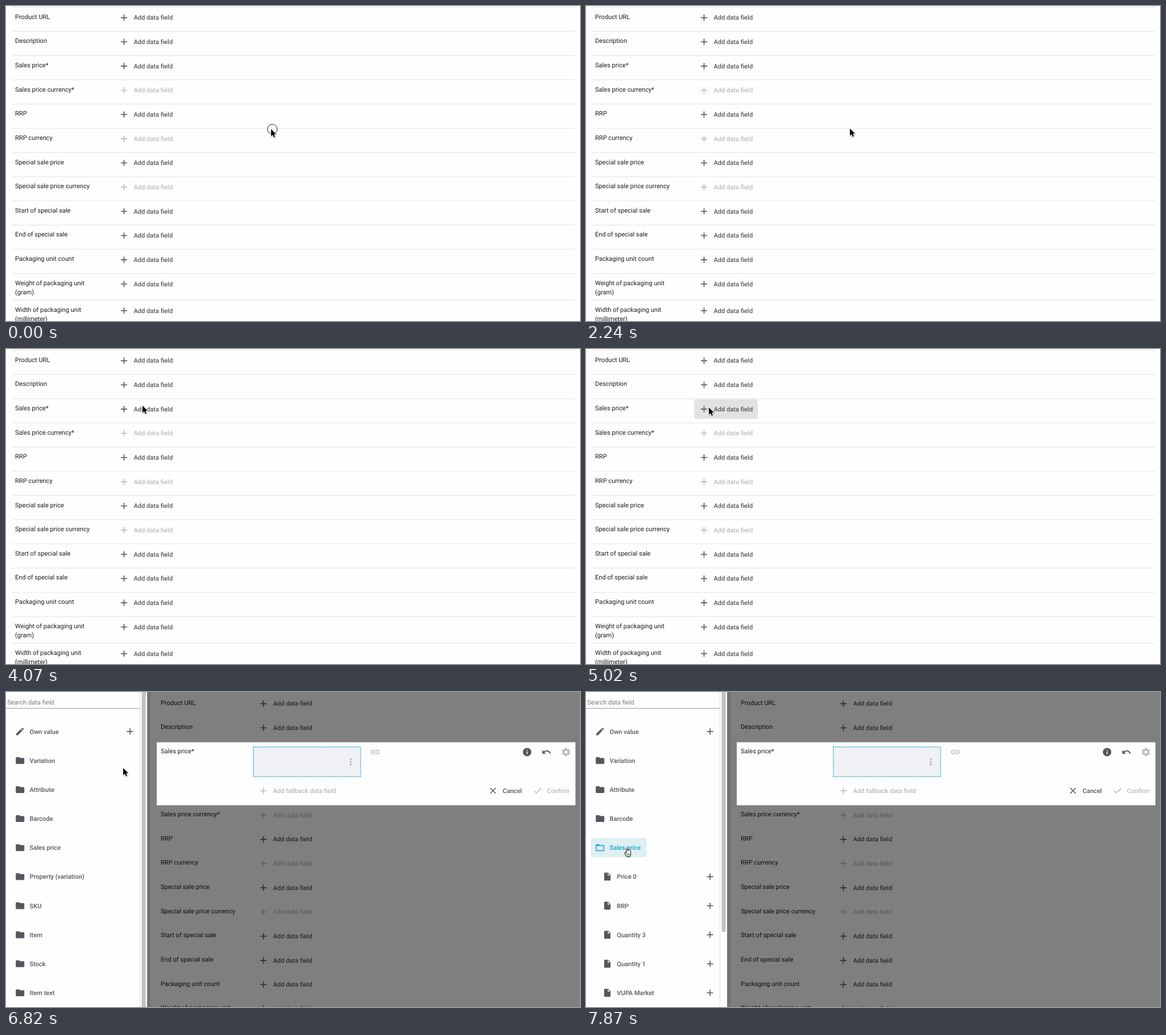
These frames come from a looping animation (1009 px wide and 555 px high, 8000 ms). An HTML page with a canvas:

```html
<!DOCTYPE html>
<html lang="en">
<head>
<meta charset="utf-8">
<title>Add data field</title>
<style>
  html, body { margin: 0; width: 100%; height: 100%; overflow: hidden; background: #fefefe; }
  canvas { display: block; }
</style>
</head>
<body>
<canvas id="stage" width="1009" height="555"></canvas>
<script>
const ctx = document.getElementById('stage').getContext('2d');
const LOOP = 8000, ROW = 42.65, ITEM = 51.15;

const labels = ['Product URL', 'Description', 'Sales price*', 'Sales price currency*', 'RRP', 'RRP currency',
  'Special sale price', 'Special sale price currency', 'Start of special sale', 'End of special sale',
  'Packaging unit count', 'Weight of packaging unit|(gram)', 'Width of packaging unit|(millimeter)'];
const folders = ['Variation', 'Attribute', 'Barcode', 'Sales price', 'Property (variation)', 'SKU', 'Item', 'Stock', 'Item text'];
const prices = ['Price 0', 'RRP', 'Quantity 3', 'Quantity 1', 'VUPA Market'];

// Icons on a 24 unit grid
const icons = {
  plus: 'M19 13h-6v6h-2v-6H5v-2h6V5h2v6h6z',
  folder: 'M10 4H4c-1.1 0-2 .9-2 2v12c0 1.1.9 2 2 2h16c1.1 0 2-.9 2-2V8c0-1.1-.9-2-2-2h-8z',
  folderOpen: 'M20 6h-8l-2-2H4c-1.1 0-2 .9-2 2v12c0 1.1.9 2 2 2h16c1.1 0 2-.9 2-2V8c0-1.1-.9-2-2-2zm0 12H4V8h16z',
  file: 'M6 2c-1.1 0-2 .9-2 2v16c0 1.1.9 2 2 2h12c1.1 0 2-.9 2-2V8l-6-6zm7 7V3.5L18.5 9z',
  pencil: 'M3 17.25V21h3.75L17.8 9.94l-3.75-3.75zM20.7 7.04c.4-.4.4-1 0-1.4l-2.34-2.35c-.4-.4-1-.4-1.4 0l-1.83 1.83 3.75 3.75z',
  info: 'M12 2a10 10 0 1 0 0 20a10 10 0 1 0 0-20zm1 15h-2v-6h2zm0-8h-2V7h2z',
  undo: 'M12.5 8c-2.65 0-5 1-6.9 2.6L2 7v9h9l-3.6-3.6c1.4-1.2 3.1-1.9 5.1-1.9 3.5 0 6.5 2.3 7.6 5.5l2.4-.8C21 11 17.1 8 12.5 8z',
  link: 'M11 8.9H7a3.1 3.1 0 0 0 0 6.2h4V17H7A5 5 0 0 1 7 7h4zM8 13h8v-2H8zM13 8.9h4a3.1 3.1 0 0 1 0 6.2h-4V17h4a5 5 0 0 0 0-10h-4z',
  close: 'M19 6.4L17.6 5 12 10.6 6.4 5 5 6.4 10.6 12 5 17.6 6.4 19 12 13.4 17.6 19 19 17.6 13.4 12z',
  check: 'M9 16.2L4.8 12l-1.4 1.4L9 19 21 7l-1.4-1.4z'
};
for (const name in icons) icons[name] = new Path2D(icons[name]);

const arrowShape = new Path2D('M0 0V12.6L2.9 9.9 4.9 14.5 7 13.6 5 9.1H9z');
const handShape = new Path2D('M-2 8V1.6C-2-.2.6-.2.6 1.6V5.6C1-.1 5.4 3.8 5.5 6.4V10.5L4.3 14.8H-1.2L-4.6 9.8C-5.4 8-3.6 7.3-2 9z');

// Each move: first step, last step, number of steps, points evenly spaced along the way
const moves = [
  [0, 0, 1, [[466, 217], [466, 217]]],
  [2240, 2240, 1, [[466, 217], [464, 216]]],
  [2500, 2590, 2, [[464, 216], [440, 215], [425, 213]]],
  [2950, 3720, 10, [[425, 213], [416, 210], [396, 202], [340, 170], [278, 130], [250, 119]]],
  [3810, 4160, 5, [[250, 119], [243, 104], [238, 97]]],
  [4320, 4670, 5, [[238, 97], [255, 98], [272, 101], [258, 104], [232, 105], [212, 104]]],
  [4850, 4850, 1, [[212, 104], [216, 103]]],
  [6820, 7600, 10, [[216, 103], [196, 165], [165, 215], [125, 252], [90, 283], [73, 275]]]
];

function pointerAt(t) {
  const [from, to, steps, points] = moves.findLast(m => t >= m[0]);
  const gap = steps > 1 ? (to - from) / (steps - 1) : 1;
  const done = Math.min(steps, Math.floor((t - from + 8) / gap) + 1) / steps;
  const along = done * (points.length - 1);
  const i = Math.min(points.length - 2, Math.floor(along));
  return points[i].map((v, k) => v + (points[i + 1][k] - v) * (along - i));
}

function rect(x, y, w, h, color) {
  ctx.fillStyle = color;
  ctx.fillRect(x, y, w, h);
}

function text(str, x, middle, color, weight = 500) {
  ctx.font = `${weight} 11.07px Roboto, sans-serif`;
  ctx.fillStyle = color;
  ctx.fillText(str, x, middle + 4);
}

function icon(name, x, y, color, scale = 0.77) {
  ctx.save();
  ctx.translate(x, y);
  ctx.scale(scale, scale);
  ctx.translate(-12, -12);
  ctx.fillStyle = color;
  ctx.fill(icons[name], 'evenodd');
  ctx.restore();
}

function circle(x, y, r) {
  ctx.beginPath();
  ctx.arc(x, y, r, 0, 7);
}

function gear(x, y, color) {
  ctx.save();
  ctx.translate(x, y);
  for (let i = 0; i < 6; i++) {
    ctx.rotate(Math.PI / 3);
    rect(-2, -7.3, 4, 5, color);
  }
  circle(0, 0, 5.5);
  ctx.fill();
  ctx.fillStyle = '#fefefe';
  circle(0, 0, 2.6);
  ctx.fill();
  ctx.restore();
}

function rows(dim) {
  const [ink, strong, weak] = dim ? ['#0c0c0c', '#2b2b2f', '#5e5e5e'] : ['#1c1c1c', '#56575d', '#bcbcbc'];
  const labelX = dim ? 272 : 16, shift = dim ? 245 : 0;
  labels.forEach((label, i) => {
    const top = i * ROW + (i > 11 ? 4.3 : 0) + (dim && i > 2 ? 68.4 : 0);
    const color = label.includes('currency') ? weak : strong;
    if (!dim) rect(10, top + 1.5, 991, 1.3, '#e9e9e9');
    label.split('|').forEach((line, k) => text(line, labelX, top + 18.6 + k * 16.4, ink, 400));
    icon('plus', 207.5 + shift, top + 20.6, color, 0.79);
    text('Add data field', 224.4 + shift, top + 20.4, color);
  });
}

function card() {
  const strong = '#56575d', weak = '#b9b9b9';
  rect(265, 88.5, 736, 111, '#fefefe');
  text('Sales price*', 272, 103.9, '#1c1c1c', 400);
  rect(434, 96, 190, 54, '#f0f1f4');
  ctx.strokeStyle = '#19a8d1';
  ctx.lineWidth = 1.6;
  ctx.setLineDash([1.6, 1.6]);
  ctx.strokeRect(434.8, 96.8, 188.6, 52.4);
  ctx.setLineDash([]);
  ctx.fillStyle = '#a5a6aa';
  for (const dy of [-4.7, 0, 4.7]) {
    circle(606, 123 + dy, 1.5);
    ctx.fill();
  }
  icon('link', 649, 105.7, weak, 0.75);
  icon('info', 916, 105.8, strong, 0.74);
  icon('undo', 950, 105.8, strong, 0.74);
  gear(984.3, 105.8, weak);
  icon('plus', 452.5, 174, weak, 0.79);
  text('Add fallback data field', 469.4, 173.8, weak);
  icon('close', 856, 174, strong, 0.75);
  text('Cancel', 873, 173.8, strong);
  icon('check', 934.5, 173.8, weak, 0.75);
  text('Confirm', 951, 173.8, weak);
}

function sidebar(t) {
  const strong = '#56575d', blue = '#16a4c9';
  const pressed = t >= 7690, open = t >= 7780;
  rect(0, 0, 248, 555, '#fefefe');
  rect(235, 0, 1, 555, '#dedede');
  rect(248, 0, 6.5, 555, '#737373');
  ctx.fillStyle = '#c1c1c1';
  ctx.beginPath();
  ctx.roundRect(238.5, -5, 7, open ? 428 : 570, 3.5);
  ctx.fill();
  text('Search data field', 2.3, 18.2, '#777', 400);
  rect(0, 28.3, 235, 1, '#949494');
  icon('pencil', 24.7, 69.6, strong, 0.74);
  text('Own value', 41.5, 69.6, strong);
  icon('plus', 218, 69.6, strong, 0.79);
  if (pressed) {
    ctx.fillStyle = open ? '#dfeff3' : '#edf6f8';
    ctx.beginPath();
    ctx.roundRect(8.5, 257, 98, 34, 2);
    ctx.fill();
  }
  folders.slice(0, open ? 4 : 9).forEach((name, i) => {
    const y = 69.6 + ITEM * (i + 1), active = pressed && i === 3;
    icon(active && open ? 'folderOpen' : 'folder', 24.7, y, active ? blue : strong, 0.75);
    text(name, 41.5, y, active ? blue : strong);
  });
  if (open) prices.forEach((name, i) => {
    const y = 69.6 + ITEM * (i + 5);
    icon('file', 37.5, y, strong, 0.7);
    text(name, 54.3, y, strong);
    icon('plus', 218, y, strong, 0.79);
  });
}

function pointer(x, y, hand) {
  ctx.save();
  ctx.translate(x, y);
  ctx.lineJoin = 'round';
  ctx.shadowColor = 'rgba(0,0,0,.3)';
  ctx.shadowBlur = 2;
  ctx.shadowOffsetY = 1;
  ctx.strokeStyle = hand ? '#111' : '#fff';
  ctx.lineWidth = hand ? 1.1 : 1.6;
  ctx.stroke(hand ? handShape : arrowShape);
  ctx.shadowColor = 'transparent';
  ctx.fillStyle = hand ? '#fff' : '#000';
  ctx.fill(hand ? handShape : arrowShape);
  if (hand) {
    ctx.lineWidth = 0.8;
    ctx.stroke(handShape);
    ctx.beginPath();
    for (const dx of [-0.4, 1.4, 3.2]) {
      ctx.moveTo(dx, 9.5);
      ctx.lineTo(dx, 12.5);
    }
    ctx.stroke();
  }
  ctx.restore();
}

function draw(t) {
  const dialog = t >= 5110;
  ctx.textRendering = 'geometricPrecision';
  rect(0, 0, 1009, 555, dialog ? '#7f7f7f' : '#fefefe');
  if (!dialog && t >= 4850) {
    rect(190.5, 88.5, 111.5, 34.5, t < 4940 ? '#f4f4f4' : t < 5020 ? '#e9e9e9' : '#e2e2e2');
  }
  rows(dialog);
  if (dialog) {
    card();
    sidebar(t);
  }
  if (t < 90) {
    ctx.strokeStyle = '#222';
    ctx.lineWidth = 1;
    circle(468.2, 217, 8.6);
    ctx.stroke();
  }
  const [x, y] = pointerAt(t);
  pointer(x, y, dialog && x < 107 && y > 257);
}

const start = performance.now();
function tick() {
  draw((performance.now() - start) % LOOP);
  requestAnimationFrame(tick);
}
tick();
</script>
</body>
</html>
```
